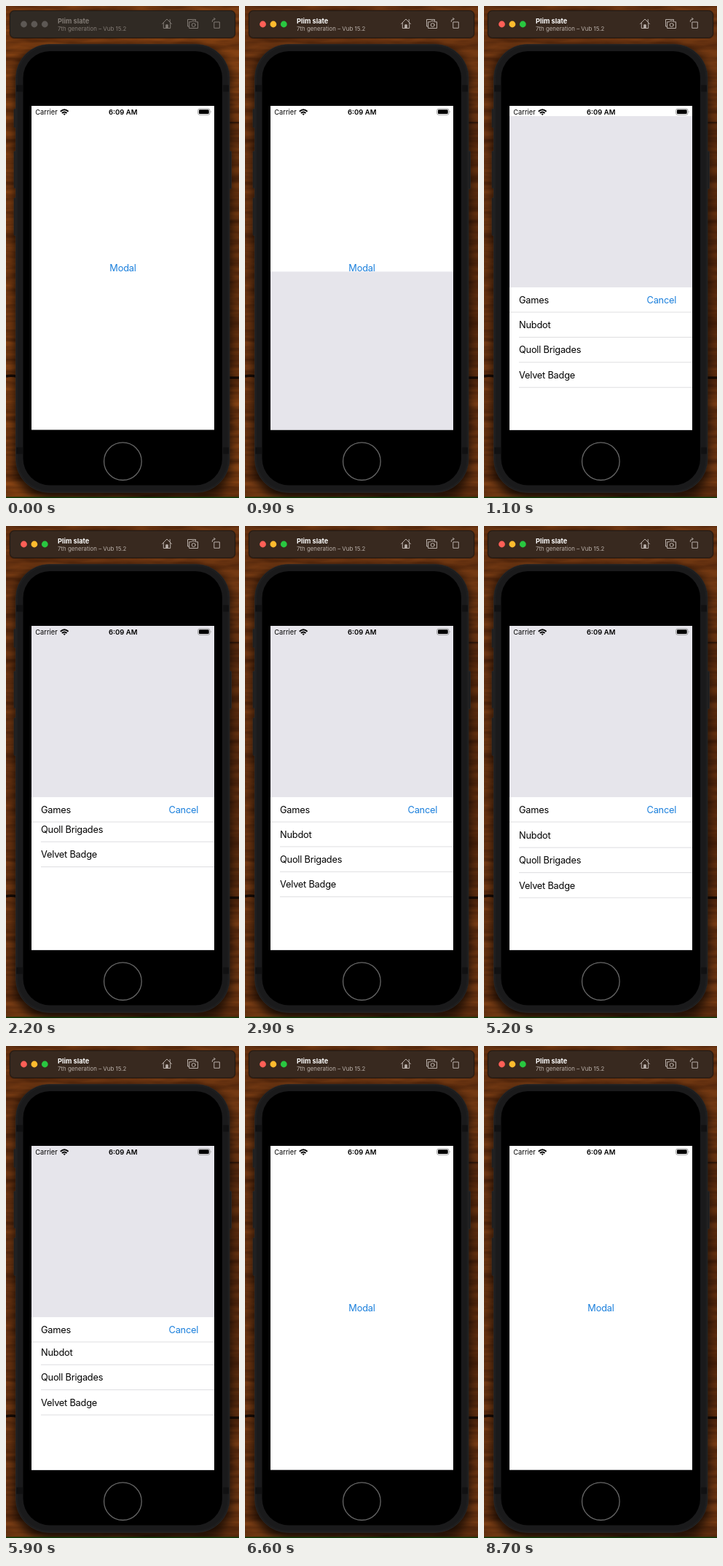
These frames come from a looping animation (320x675 px, 8800 ms). An HTML page:

```html
<!DOCTYPE html>
<html lang="en">
<head>
<meta charset="utf-8">
<title>Modal list</title>
<style>
  html, body { margin: 0; width: 100%; height: 100%; overflow: hidden; background: #000; }
  svg { display: block; width: 320px; height: 675px; font-family: Inter, sans-serif; }
  .ui { font-size: 12.8px; letter-spacing: -.22px; }
  .link { fill: #1a7fdc; }
  .rule { stroke: #d6d6d8; stroke-width: .8; }
  .icon { fill: none; stroke: var(--icon); stroke-width: 1; stroke-linejoin: round; stroke-linecap: round; }
  #stage { --wood: #8a4514; --bar: #302a24; --title: #817a74; --sub: #817a74; --icon: #817a74;
           --red: #5d5854; --amber: #5d5854; --green: #5d5854; }
  #stage.active { --wood: #7a3d14; --bar: #38291f; --title: #fff; --sub: #b9b0aa; --icon: #b9b0aa;
                  --red: #fe5f57; --amber: #febb2e; --green: #29c740; }
</style>
</head>
<body>
<svg id="stage" viewBox="0 0 320 675">
  <defs>
    <filter id="grain" x="0" y="0" width="1" height="1" color-interpolation-filters="sRGB">
      <feTurbulence type="fractalNoise" baseFrequency=".015 .1" numOctaves="3" seed="7"/>
      <feColorMatrix values="0 0 0 0 .2  0 0 0 0 .08  0 0 0 0 .02  1.2 0 0 0 -.3"/>
    </filter>
    <filter id="soft" x="-.1" y="-.1" width="1.2" height="1.2"><feGaussianBlur stdDeviation="7"/></filter>
    <clipPath id="screen"><rect x="35" y="137" width="251" height="444.6"/></clipPath>
    <clipPath id="listArea"><rect x="35" y="406" width="251" height="176"/></clipPath>
  </defs>

  <!-- Desk -->
  <rect width="320" height="675" fill="var(--wood)"/>
  <rect width="320" height="675" filter="url(#grain)"/>
  <path d="M306 160H320V508H306Z" fill="#2a1206" opacity=".25"/>
  <path d="M0 508Q8 506.5 16 508.5M304 510H320" fill="none" stroke="#160a04" stroke-width="3.5"/>
  <path d="M306 160H320" stroke="#2a1408" stroke-width="1.5"/>
  <rect x="12" y="58" width="296" height="618" rx="42" filter="url(#soft)" opacity=".75"/>
  <path d="M0 674.2H320" stroke="#0c3d0b" stroke-width="1.6"/>

  <!-- Window bar -->
  <rect x="4.5" y="5.5" width="311" height="39.5" rx="6.5" opacity=".3"/>
  <rect x="5.5" y="6.5" width="309" height="37" rx="6" fill="var(--bar)" stroke="#211a15"/>
  <circle cx="24.5" cy="25" r="4.4" fill="var(--red)"/>
  <circle cx="38.9" cy="25" r="4.4" fill="var(--amber)"/>
  <circle cx="53.3" cy="25" r="4.4" fill="var(--green)"/>
  <text x="71" y="23.5" font-size="9.2" font-weight="700" fill="var(--title)">Plim slate</text>
  <text x="71" y="33.8" font-size="7.9" fill="var(--sub)">7th generation – Vub 15.2</text>
  <g class="icon">
    <path d="M214.5 24.5L221 18L227.5 24.5M216.3 23.3V30.5H225.7V23.3M225.2 21.5V18.5"/>
    <path d="M219.7 30V25.8H222.3V30Z" fill="var(--icon)"/>
    <path d="M251.5 28H249.5V18.5H260.5V20.5M252 21.8H254.6L255.6 20.5H259.4L260.4 21.8H263.5V30.5H252Z"/>
    <circle cx="257.7" cy="26" r="2.5"/>
    <path d="M286.2 22H293.3V30.3H286.2ZM283.3 21.5Q283 17.8 286.8 17.8M285.6 16.2L287.2 17.8L285.6 19.4"/>
  </g>

  <!-- Phone body -->
  <g fill="#1c1c1d" stroke="#2c2c2d" stroke-width=".7">
    <rect x="11" y="141" width="5" height="26" rx="1.5"/>
    <rect x="11" y="199" width="5" height="51" rx="1.5"/>
    <rect x="11" y="263" width="5" height="52" rx="1.5"/>
    <rect x="304" y="199" width="5.5" height="52" rx="1.5"/>
    <rect x="13.5" y="52.5" width="293.5" height="615" rx="46"/>
    <rect x="15.5" y="54.5" width="289.5" height="611" rx="44" fill="#1a1a1b" stroke="#232324"/>
  </g>
  <path d="M14 113H23M298 113H306M14 610H23M298 610H306" stroke="#111112" stroke-width="9"/>
  <rect x="23.5" y="62" width="273.5" height="595.5" rx="37"/>
  <circle cx="160.4" cy="624.7" r="25.8" fill="none" stroke="#686868" stroke-width="1.3"/>

  <!-- Screen -->
  <g clip-path="url(#screen)">
    <rect x="35" y="137" width="252" height="445" fill="#fff"/>
    <text class="ui link" x="160.5" y="364" text-anchor="middle">Modal</text>
    <g id="modal">
      <rect x="35" y="137" width="252" height="445" fill="#e6e5eb"/>
      <rect x="35" y="372" width="252" height="210" fill="#fff"/>
      <g class="ui" clip-path="url(#listArea)"><g id="list"></g></g>
      <path class="rule" d="M35 406H287"/>
      <text class="ui" x="48" y="394">Games</text>
      <text class="ui link" x="264.2" y="394" text-anchor="end">Cancel</text>
    </g>
    <text x="40.3" y="149" font-size="9.3">Carrier</text>
    <g fill="none" stroke="#000" stroke-width="1.9">
      <path d="M74.8 144.8Q80.2 139.9 85.6 144.8M76.9 147Q80.2 144.1 83.5 147"/>
      <path d="M78.5 148.1Q80.2 146.9 81.9 148.1L80.2 149.9Z" fill="#000" stroke="none"/>
    </g>
    <text x="160.7" y="149" font-size="9.5" font-weight="600" text-anchor="middle">6:09 AM</text>
    <rect x="263.6" y="141" width="16.4" height="8.3" rx="2.4" fill="none" stroke="#8c8c8c" stroke-width=".8"/>
    <rect x="264.9" y="142.3" width="13.8" height="5.7" rx="1.3"/>
    <path d="M281 143.8Q282.4 145.1 281 146.5Z" fill="#8c8c8c"/>
  </g>
</svg>
<script>
const LOOP = 8800, STEP = 100, SCREEN_HEIGHT = 445, ROW = 34.4;
const stage = document.getElementById('stage');
const modal = document.getElementById('modal');
const list = document.getElementById('list');

list.innerHTML = ['Nubdot', 'Quoll Brigades', 'Velvet Badge'].map((name, i) => `
  <text x="48" y="${428 + ROW * i}">${name}</text>
  <path class="rule" d="M48 ${440.4 + ROW * i}H287"/>`).join('');

// Remaining distance (1 to 0) of a critically damped spring.
function spring(ms, rate) {
  const x = Math.max(0, ms) * rate / 1000;
  return (1 + x) * Math.exp(-x);
}

const slides = [
  { at: 810, open: true }, { at: 6120, open: false },
  { at: 6960, open: true }, { at: 8230, open: false },
];

function modalOffset(t) {
  const slide = slides.filter(s => t >= s.at).pop();
  if (!slide) return SCREEN_HEIGHT;
  const rest = spring(t - slide.at, 18.26);
  return SCREEN_HEIGHT * (slide.open ? rest : 1 - rest);
}

// Each drag pulls the list past its edge, then lets it spring back.
const drags = [
  { from: 1750, to: 2350, by: -45 }, { from: 2950, to: 3450, by: 70 },
  { from: 4350, to: 4700, by: 45 }, { from: 5250, to: 5550, by: -40 },
];

function scrollOffset(t) {
  return drags.reduce((sum, { from, to, by }) => {
    if (t < from) return sum;
    const pull = Math.sin(Math.PI / 2 * Math.min(1, (t - from) / (to - from)));
    return sum + by * pull * spring(t - to, 12);
  }, 0);
}

function draw() {
  const t = Math.floor(performance.now() % LOOP / STEP) * STEP;
  stage.classList.toggle('active', t >= 800);
  modal.setAttribute('transform', `translate(0 ${modalOffset(t).toFixed(2)})`);
  list.setAttribute('transform', `translate(0 ${scrollOffset(t).toFixed(2)})`);
  requestAnimationFrame(draw);
}
draw();
</script>
</body>
</html>
```
